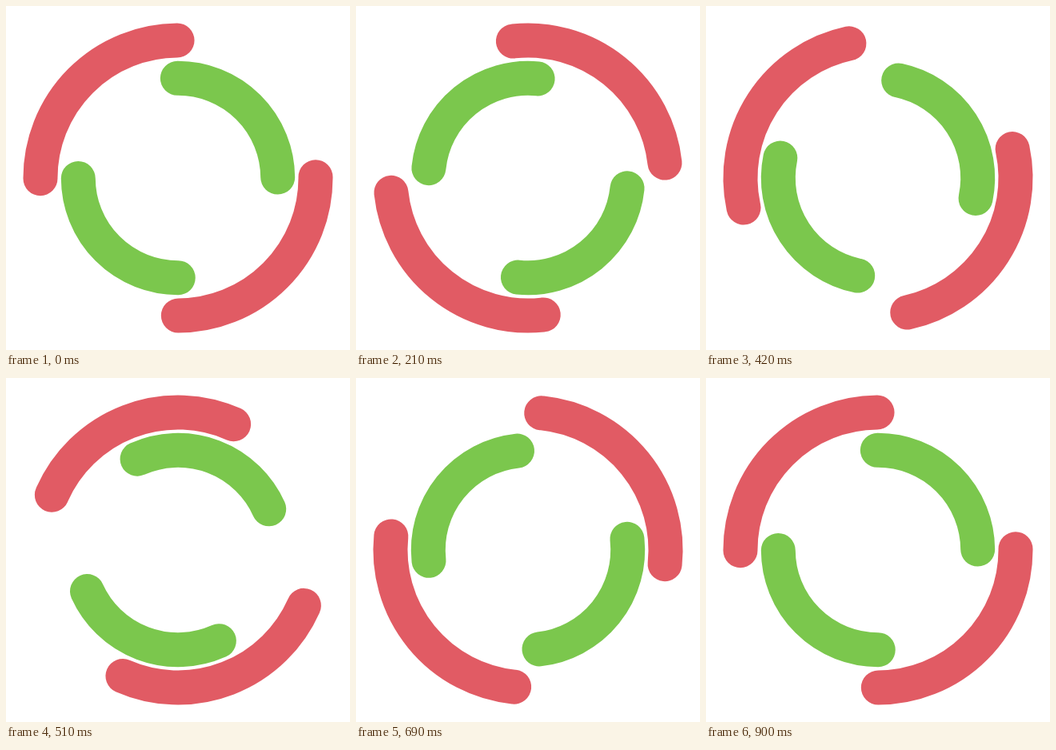
Write an HTML page that moves like this. It is 430 px wide and 430 px high and loops after 0.93 s.

```html
<!DOCTYPE html>
<html lang="en">
<head>
<meta charset="utf-8">
<title>Double ring spinner</title>
<style>
  html, body { margin: 0; height: 100%; overflow: hidden; background: #fff; }
  svg { display: block; width: 100%; height: 100%; }
  circle { fill: none; stroke-width: 10; stroke-linecap: round; stroke-dasharray: 1 1; }
</style>
</head>
<body>
<svg viewBox="0 0 100 100">
  <circle id="outer" cx="50" cy="50" r="40" pathLength="4" stroke="#e15b64"/>
  <circle id="inner" cx="50" cy="50" r="29" pathLength="4" stroke="#7bc74d" stroke-dashoffset="1"/>
</svg>
<script>
  const STEP = 30;   // ms per pose
  const TURN = 30;   // steps in a full turn; the closing pose is held one step
  const outer = document.getElementById('outer');
  const inner = document.getElementById('inner');

  const rotate = (ring, degrees) =>
    ring.setAttribute('transform', `rotate(${degrees} 50 50)`);

  function draw() {
    const step = Math.floor(performance.now() / STEP) % (TURN + 1);
    const angle = 360 * step / TURN;
    rotate(outer, angle);
    rotate(inner, -angle);
    requestAnimationFrame(draw);
  }
  draw();
</script>
</body>
</html>
```
